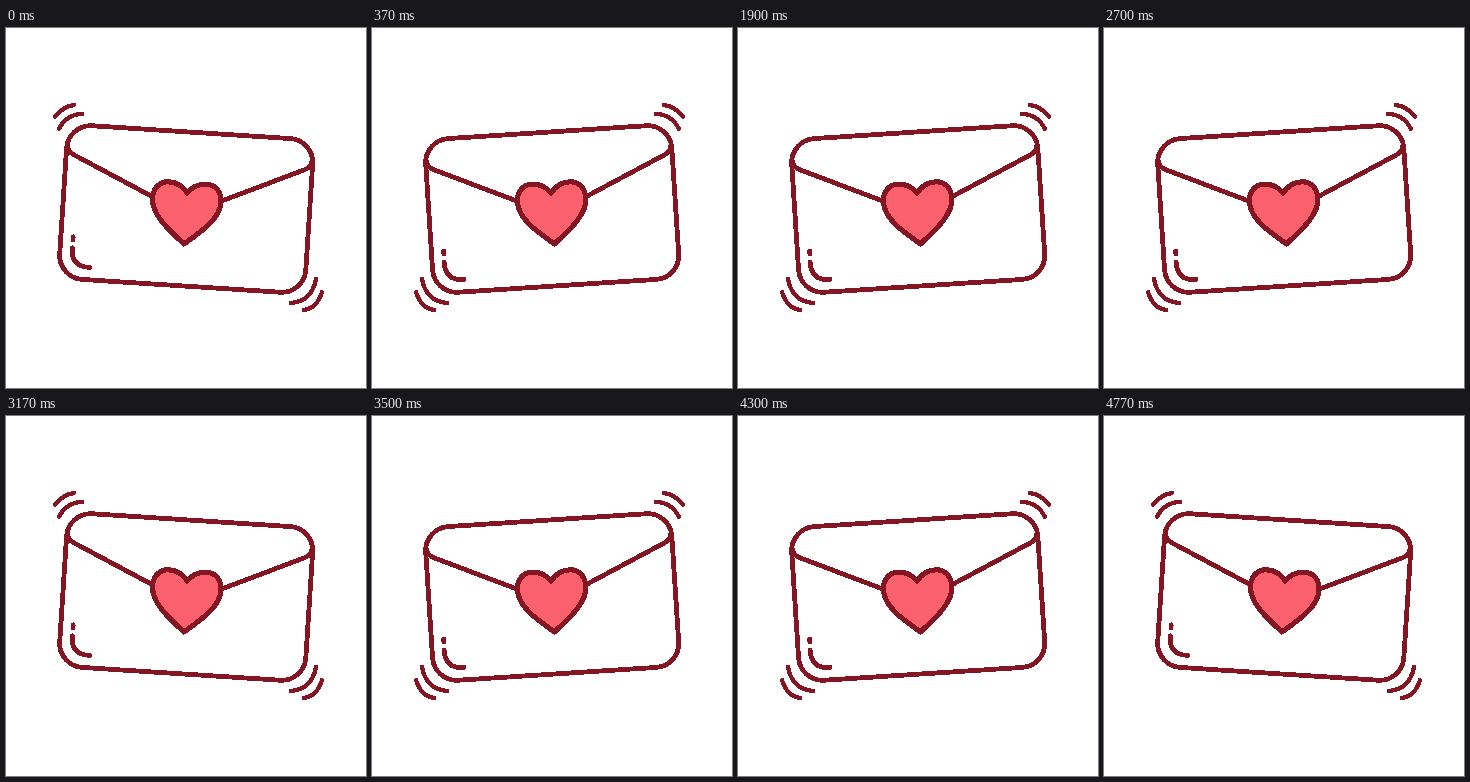
Write an HTML page that moves like this. It is 360x360 px and loops after 5.1 s.

```html
<!DOCTYPE html>
<html lang="en">
<head>
<meta charset="utf-8">
<title>Wiggling love letter</title>
<style>
  html, body { margin: 0; width: 100%; height: 100%; overflow: hidden; background: #fff; }
  svg { display: block; width: 100vw; height: 100vh; shape-rendering: crispEdges; }
  path, rect { fill: none; stroke: #841624; stroke-width: 4.8; stroke-linecap: round; stroke-linejoin: round; }
  #waves path { stroke-width: 4.3; }
  #heart { fill: #fb606d; stroke-width: 5.2; }
</style>
</head>
<body>
<svg viewBox="0 0 360 360">
  <g id="letter">
    <rect x="-123.300" y="-77" width="246.600" height="154" rx="24"/>
    <path d="M-122.500-56Q-122-50-116-47L0 5.500L116-47Q122-50 122.500-56"/>
    <path id="heart" d="M0-16C-5-23-12-26-19-26C-28-26-34.300-19-34.300-9C-34.300 8-16 22 0 35C16 22 34.300 8 34.300-9C34.300-19 28-26 19-26C12-26 5-23 0-16Z"/>
    <path d="M-111 35v3M-111.200 46C-111.500 59-105 65-92.500 64.500"/>
  </g>
  <g id="waves">
    <path d="M49 89Q56 79 68 77"/>
    <path d="M53 101Q60 86.500 76 86"/>
    <path d="M285 275Q306 273 310 251"/>
    <path d="M298 282Q311 280 316 264"/>
  </g>
</svg>
<script>
  const LOOP = 5100;
  const FLIPS = [370, 800, 1130, 1570, 1900, 2370, 2700, 3170, 3500, 3970, 4300, 4770];
  const TILT = 3.7;
  const letter = document.getElementById('letter');
  const waves = document.getElementById('waves');
  const start = performance.now();

  // The letter snaps between two tilts; the shake marks mirror with it.
  function draw(ms) {
    const t = ms % LOOP;
    const left = FLIPS.filter(flip => flip <= t).length % 2 === 1;
    letter.setAttribute('transform', `translate(180.2 181) rotate(${left ? -TILT : TILT})`);
    waves.setAttribute('transform', left ? 'translate(360 0) scale(-1 1)' : '');
  }

  function tick() {
    draw(Math.max(0, performance.now() - start));
    requestAnimationFrame(tick);
  }
  tick();
</script>
</body>
</html>
```
